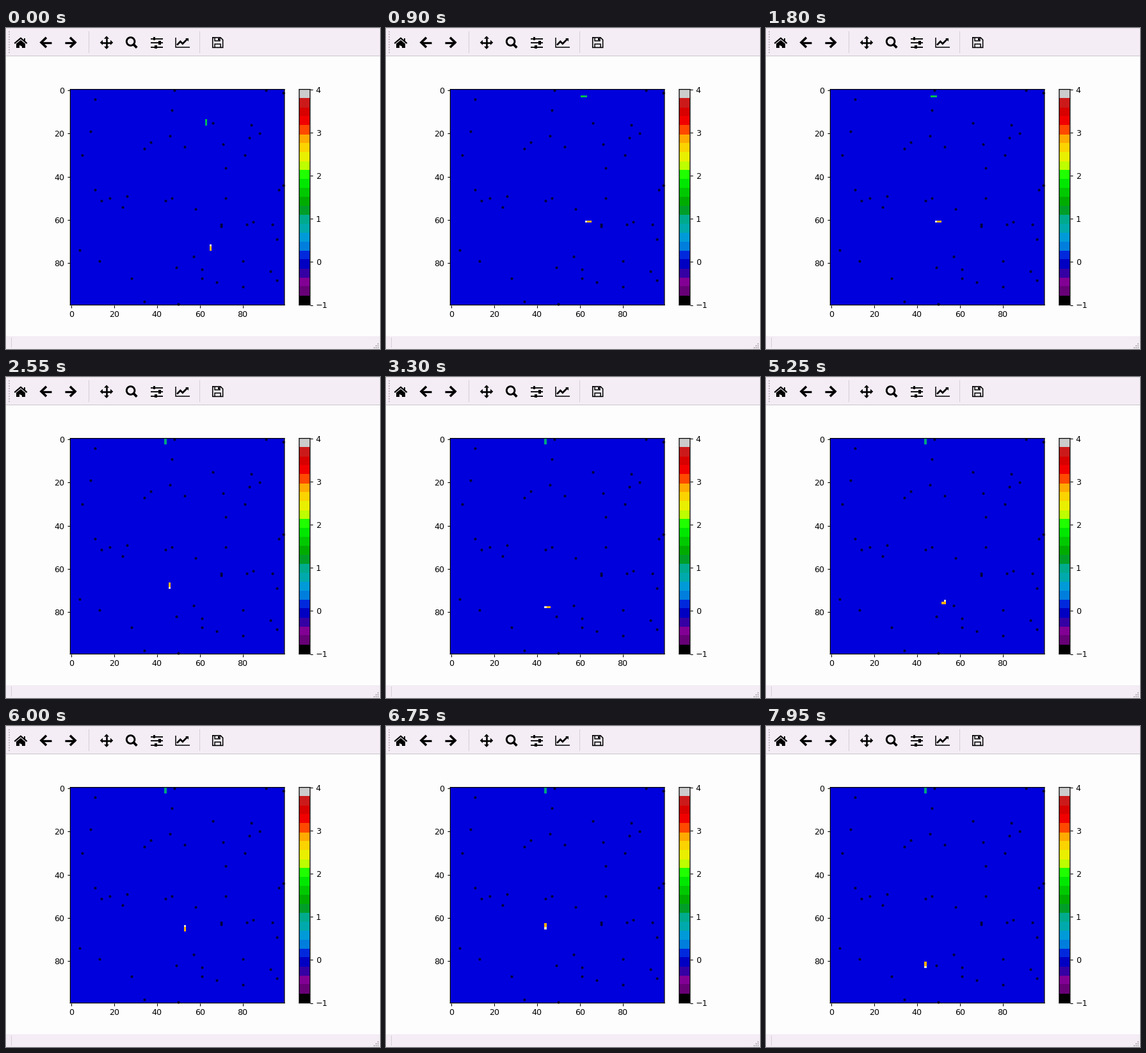
A matplotlib script that plays this animation: 584 px wide and 500 px high, repeating every 8000 ms.

```python
import math

import matplotlib.pyplot as plt
import numpy as np
from matplotlib.animation import FuncAnimation
from matplotlib.patches import Circle, Polygon, Rectangle

W, H, DPI = 584, 500, 100
PX = 72 / DPI
SIZE = 100
INTERVAL, FRAMES = 50, 160
TICKS_PER_STEP = 3
BAR, CANVAS, INK = "#f4edf5", "#fdfdfd", "#000000"

plt.rcParams.update({
    "font.family": "DejaVu Sans", "font.size": 9.1, "axes.linewidth": 0.9,
    "xtick.major.size": 3.2, "ytick.major.size": 3.2,
    "xtick.major.pad": 3.2, "ytick.major.pad": 3.2,
})
fig = plt.figure(figsize=(W / DPI, H / DPI), dpi=DPI, facecolor=CANVAS)


def axes_at(left, top, right, bottom):
    ax = fig.add_axes([left / W, 1 - bottom / H, (right - left) / W, (bottom - top) / H])
    for spine in ax.spines.values():
        spine.set_snap(False)
    return ax


# Window chrome, drawn in pixel coordinates
ui = axes_at(0, 0, W, H)
ui.set(xlim=(0, W), ylim=(H, 0))
ui.axis("off")


def rect(x0, y0, x1, y1, color=INK):
    ui.add_patch(Rectangle((x0, y0), x1 - x0, y1 - y0, color=color, lw=0))


def poly(*points, color=INK):
    ui.add_patch(Polygon(points, closed=True, color=color, lw=0))


def stroke(*points, width=2.0, color=INK):
    xs, ys = zip(*points)
    ui.plot(xs, ys, color=color, lw=width * PX,
            solid_capstyle="butt", solid_joinstyle="miter")


def home_icon(cx):
    stroke((cx - 9.7, 24), (cx, 15.8), (cx + 9.7, 24), width=2.2)
    rect(cx + 4.6, 15.5, cx + 7, 20.5)
    poly((cx - 6.7, 24.5), (cx, 19), (cx + 6.7, 24.5), (cx + 6.7, 31))
    poly((cx - 6.7, 24.5), (cx, 19), (cx + 6.7, 24.5))
    rect(cx - 6.7, 24.4, cx - 2, 31)
    rect(cx + 2, 24.4, cx + 6.7, 31)
    rect(cx - 6.7, 24.4, cx + 6.7, 26)


def arrow_icon(cx, direction):
    tip = cx + 7 * direction
    stroke((cx - direction, 14.8), (tip, 22.5), (cx - direction, 30.2), width=3.6)
    stroke((tip, 22.5), (cx - 9 * direction, 22.5), width=3.2)


def move_icon(cx, cy):
    for dx, dy in ((1, 0), (-1, 0), (0, 1), (0, -1)):
        stroke((cx, cy), (cx + 7 * dx, cy + 7 * dy), width=2.6)
        base = cx + 6 * dx, cy + 6 * dy
        poly((cx + 10.3 * dx, cy + 10.3 * dy),
             (base[0] + 4 * dy, base[1] + 4 * dx),
             (base[0] - 4 * dy, base[1] - 4 * dx))


def zoom_icon(cx, cy):
    ui.add_patch(Circle((cx, cy), 6.3, fill=False, ec=INK, lw=2.9 * PX))
    stroke((cx + 4.2, cy + 4.2), (cx + 9.7, cy + 9.7), width=3.8)


def sliders_icon(cx, cy):
    for row, knob in zip((-1, 0, 1), (-4, 4.5, -1.5)):
        x, y = cx + knob, cy + 6.5 * row
        stroke((cx - 9.5, y), (cx + 9.5, y), width=1.8)
        rect(x - 2.7, y - 2.6, x + 2.7, y + 2.6, BAR)
        rect(x - 1.8, y - 2.6, x + 1.8, y + 2.6)


def chart_icon():
    stroke((264.7, 14.5), (264.7, 30.3), (286.5, 30.3), width=1.5)
    stroke((267, 26.5), (272.3, 21), (275.8, 24.5), (283, 17.3), width=2.7)
    poly((279.5, 15.5), (285.2, 15.5), (285.2, 21.2))


def save_icon():
    stroke((322.7, 14.9), (335, 14.9), (338.6, 18.5), (338.6, 30.4),
           (322.7, 30.4), (322.7, 14.2), width=1.6)
    stroke((326.3, 14.9), (326.3, 20.3), (333.8, 20.3), (333.8, 14.9), width=1.5)
    rect(330.5, 15.5, 332.7, 19)
    stroke((326.3, 30.4), (326.3, 24.8), (335, 24.8), (335, 30.4), width=1.5)


rect(0, 0, W, 43, BAR)
rect(0, 0, W, 1, "#e6dfe7")
rect(0, 43, W, 44, "#c9c5ca")
rect(0, 480, W, H, BAR)
for x in (129, 302):
    rect(x, 5, x + 1, 39, "#d5ced6")
for y in range(5, 40, 4):
    rect(4, y, 6, y + 2, "#c6bfc7")
rect(8, 482, 9, 498, "#d5ced6")
for i in range(3):
    for j in range(i + 1):
        rect(574 + 3 * i, 497 - 3 * j, 576 + 3 * i, 499 - 3 * j, "#b9b3ba")

home_icon(23)
arrow_icon(62, -1)
arrow_icon(101, 1)
move_icon(157, 22.7)
zoom_icon(194.6, 21)
sliders_icon(235.5, 23)
chart_icon()
save_icon()


# Snakes
def walk(*corners):
    """Every cell passed on straight runs between the corners."""
    cells = [corners[0]]
    for x1, y1 in corners[1:]:
        while cells[-1] != (x1, y1):
            x, y = cells[-1]
            cells.append((x + int(np.sign(x1 - x)), y + int(np.sign(y1 - y))))
    return cells


LENGTH = 3
GREEN_PATH = walk((63, 16), (63, 3), (44, 3), (44, 0))
ORANGE_PATH = walk((65, 74), (65, 61), (46, 61), (46, 78), (35, 78), (35, 76),
                   (53, 76), (53, 63), (44, 63), (44, 83))
BLUE = (0, 0, 221)
GREEN_HEAD, GREEN_BODY, GREEN_DEAD = (0, 200, 60), (5, 182, 95), (0, 165, 125)
ORANGE_HEAD, ORANGE_BODY = (228, 222, 214), (255, 175, 0)


def put_snake(grid, path, moves, head, body):
    start = min(moves, len(path) - LENGTH)
    *tail, front = path[start:start + LENGTH]
    for col, row in tail:
        grid[row, col] = body
    grid[front[1], front[0]] = head


def render(step):
    moves = max(0, math.floor(2.272 * step - 0.22))
    grid = np.full((SIZE, SIZE, 3), BLUE, dtype=np.uint8)
    if moves > len(GREEN_PATH) - LENGTH:
        put_snake(grid, GREEN_PATH, moves, GREEN_DEAD, GREEN_DEAD)
    else:
        put_snake(grid, GREEN_PATH, moves, GREEN_HEAD, GREEN_BODY)
    put_snake(grid, ORANGE_PATH, moves, ORANGE_HEAD, ORANGE_BODY)
    return grid


ax = axes_at(100.4, 95.6, 434.8, 431.5)
image = ax.imshow(render(0), interpolation="nearest", aspect="auto")
ax.set(xticks=range(0, SIZE, 20), yticks=range(0, SIZE, 20))

# Obstacles: scattered at random, off the snakes' way
rng = np.random.default_rng(7)
scattered = map(tuple, rng.integers(0, SIZE, (50, 2)).tolist())
free = [cell for cell in scattered if cell not in GREEN_PATH + ORANGE_PATH]
ax.plot(*zip(*free), "o", color="#00003c", ms=4.2 * PX, mew=0)

# Colour scale in visible bands
scale = axes_at(457.8, 95.6, 474.8, 431.5)
scale.imshow(np.linspace(-1, 4, 256)[:, None], cmap=plt.get_cmap("nipy_spectral", 24),
             aspect="auto", origin="lower", extent=(0, 1, -1, 4), interpolation="nearest")
scale.set(xticks=[], yticks=range(-1, 5))
scale.yaxis.tick_right()


def update(frame):
    image.set_data(render(frame // TICKS_PER_STEP))
    return [image]


anim = FuncAnimation(fig, update, frames=FRAMES, interval=INTERVAL,
                     repeat=True, repeat_delay=0)
plt.show()
```
